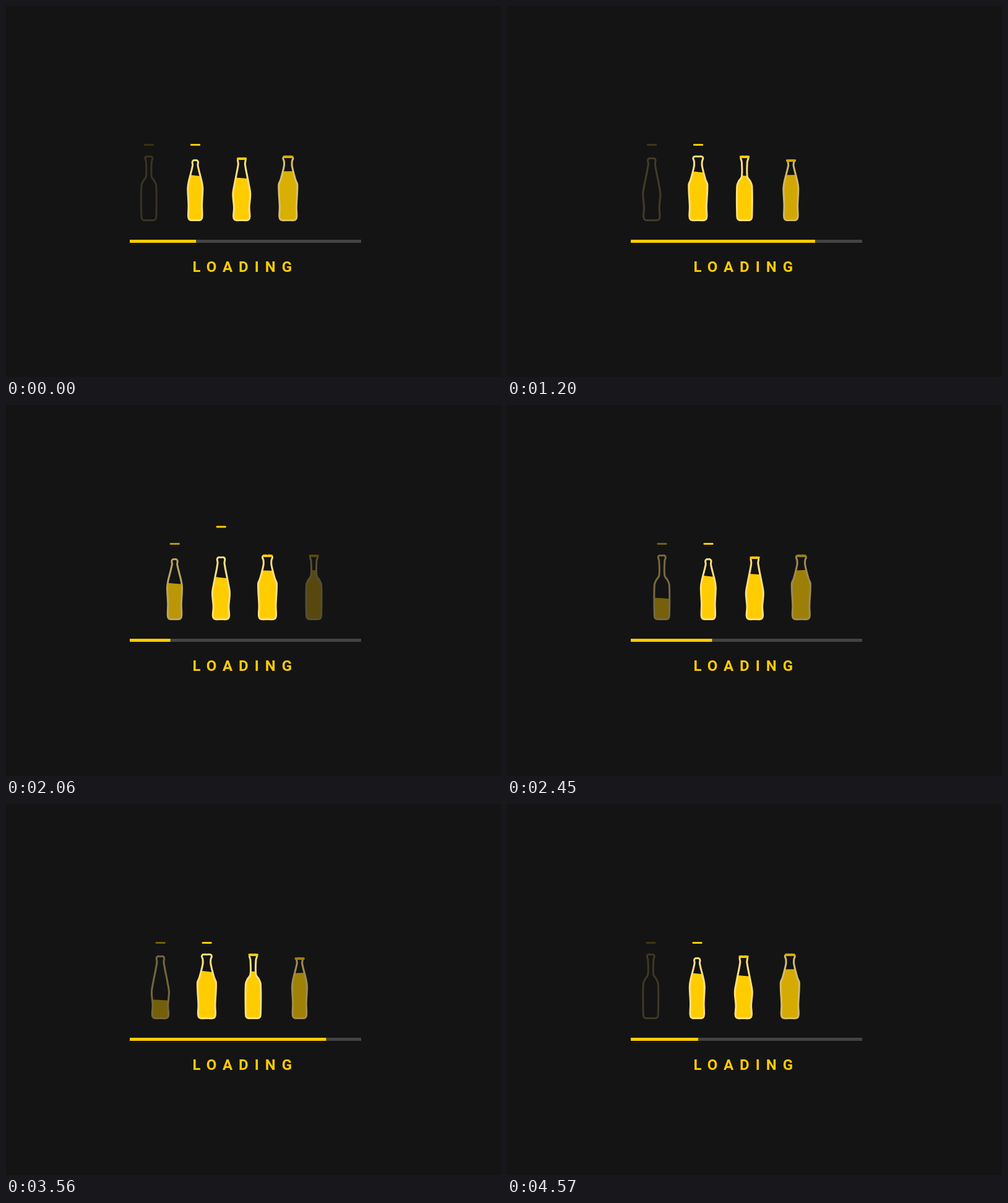
An HTML page that plays this animation: 800x600 px, repeating every 4.67 s.

```html
<!DOCTYPE html>
<html lang="en">
<head>
<meta charset="utf-8">
<title>Loading</title>
<style>
  html, body { margin: 0; width: 100%; height: 100%; overflow: hidden; background: #141414; }
  svg { display: block; width: 100vw; height: 100vh; }
  text { font: 700 24px Roboto, sans-serif; letter-spacing: 10px; fill: #fc0; }
</style>
</head>
<body>
<svg viewBox="0 0 800 600">
  <g id="row"></g>
  <rect x="200" y="378" width="374" height="5" fill="#444"/>
  <rect id="bar" x="200" y="378" height="5" fill="#fc0"/>
  <text x="301.4" y="430">LOADING</text>
</svg>
<script>
const LOOP = 4670, HOLD = 100, CYCLE = 2279;
const START = 219, GAP = 75, SPAN = GAP * 4, END = START + SPAN;
const BASE = 346.5, HEADROOM = 23.7, GOLD = '#fc0';

// Half widths of lip and foot, and key points [half width, y] between them
const TYPES = [
  { top: 243.5, lip: 6, foot: 12, side: [[4.5, 252], [4.5, 276], [9, 283], [12, 291]] },
  { top: 249.5, lip: 4.6, foot: 11.2, side: [[4.2, 258], [10.5, 284], [12, 295], [10.8, 322]] },
  { top: 246.5, lip: 6.2, foot: 13.2, side: [[5.5, 256], [11.5, 288], [14, 304], [12.3, 326]] },
  { top: 243.5, lip: 8, foot: 14, side: [[6.5, 251], [6.5, 259], [12, 281], [15, 289], [13.5, 325]] }
];

const ramp = (x, a, b) => Math.max(0, Math.min(1, (x - a) / (b - a)));
const mod = (v, n) => ((v % n) + n) % n;

function profile({ top, lip, foot, side }) {
  return [
    [0, top], [lip - 2, top], [lip, top + 2.5],
    ...side,
    [foot, BASE - 6], [foot - 1.5, BASE - 1.3], [foot - 4.5, BASE], [0, BASE]
  ];
}

// Smooth closed curve through the mirrored half outline
function outline(half) {
  const left = half.slice(1, -1).reverse().map(([x, y]) => [-x, y]);
  const pts = half.concat(left), n = pts.length;
  const at = i => pts[mod(i, n)];
  const dir = i => {
    const a = at(i - 1), b = at(i + 1), dx = b[0] - a[0], dy = b[1] - a[1], l = Math.hypot(dx, dy);
    return [dx / l, dy / l];
  };
  let d = 'M' + at(0);
  for (let i = 0; i < n; i++) {
    const a = at(i), b = at(i + 1), u = dir(i), v = dir(i + 1);
    const s = Math.hypot(b[0] - a[0], b[1] - a[1]) / 3;
    d += `C${a[0] + u[0] * s},${a[1] + u[1] * s} ${b[0] - v[0] * s},${b[1] - v[1] * s} ${b}`;
  }
  return d + 'Z';
}

function set(el, attrs) {
  for (const k in attrs) el.setAttribute(k, attrs[k]);
}

function add(parent, tag, attrs = {}) {
  const el = document.createElementNS('http://www.w3.org/2000/svg', tag);
  set(el, attrs);
  return parent.appendChild(el);
}

const row = document.getElementById('row');
const bar = document.getElementById('bar');

const bottles = TYPES.map((type, i) => {
  const d = outline(profile(type));
  const root = add(row, 'g');
  const body = add(root, 'g');
  add(add(body, 'clipPath', { id: 'clip' + i }), 'path', { d });
  const liquid = add(body, 'path', { fill: GOLD, 'clip-path': `url(#clip${i})` });
  add(body, 'path', { d, fill: 'none', stroke: '#ffe07f', 'stroke-width': 3 });
  const lid = add(body, 'rect', { x: -7.8, y: type.top - 1.5, width: 16, height: 4, rx: 1.3, fill: GOLD });
  const cap = add(root, 'rect', { x: -7.8, width: 16, height: 3, rx: 1, fill: GOLD });
  return { full: type.top + HEADROOM, root, body, liquid, lid, cap };
});

// The cap rises, then drops onto the bottle
function capY(x) {
  const up = ramp(x, 330, 350), down = ramp(x, 350, 368);
  return 223 - 28 * up * (2 - up) + 45 * down ** 2;
}

// Distance of the surface below its resting level: filling, then a slosh at capping
function drop(x) {
  const unfilled = 1 - ramp(x, 230, 300);
  return 84 * unfilled ** 1.8 + 10.5 * Math.exp(-(((x - 362) / 36) ** 2));
}

function drawBottle(b, x) {
  const fade = Math.min(ramp(x, START, START + GAP), ramp(x, END, END - GAP));
  const lift = 4 * Math.sin(Math.PI * ramp(x, 353, 377));
  const level = b.full + drop(x);
  const slant = 2 * Math.sin(Math.PI * (x - 210) / 235);
  set(b.root, { transform: `translate(${x})`, opacity: fade });
  set(b.body, { transform: `translate(0 ${-lift})` });
  set(b.liquid, { d: `M-18,${level - slant}L18,${level + slant}V370H-18Z` });
  set(b.lid, { opacity: ramp(x, 361, 364) });
  set(b.cap, { y: capY(x), opacity: ramp(x, 369, 361) });
}

function draw(ms) {
  const t = Math.min(ms % LOOP, LOOP - HOLD);
  const lag = .0175 * Math.sin(Math.PI * ramp(t, 0, 3050));
  const p = .286 + t / CYCLE - lag;
  bar.setAttribute('width', 374 * (p % 1));
  bottles.forEach((b, i) => drawBottle(b, START + mod(144.9 - START + SPAN * p + GAP * i, SPAN)));
}

const began = performance.now();
function tick() {
  draw(performance.now() - began);
  requestAnimationFrame(tick);
}
tick();
</script>
</body>
</html>
```
